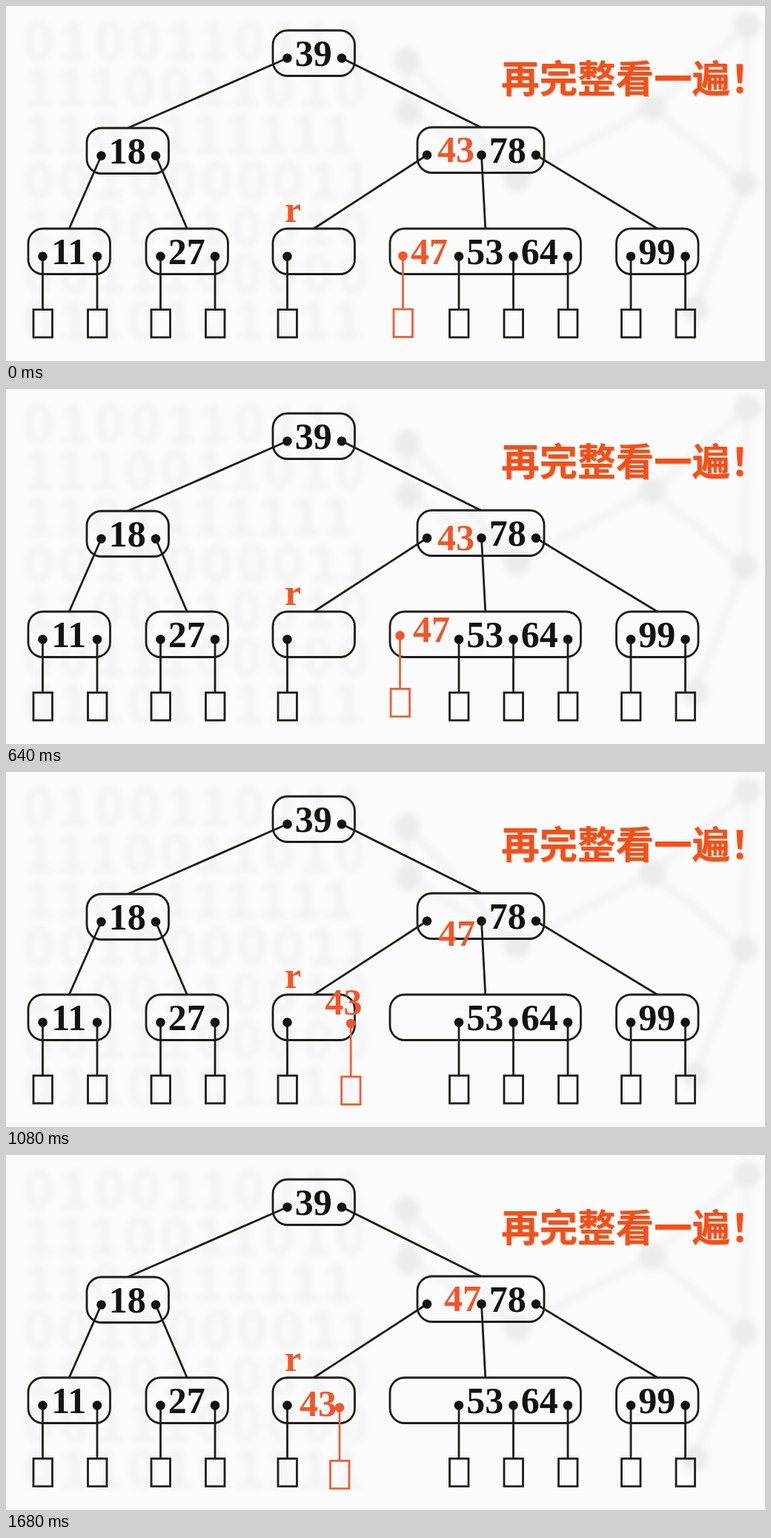
These frames come from a looping animation (1024x480 px, 1720 ms). An HTML page:

```html
<!DOCTYPE html>
<html lang="zh-CN">
<head>
<meta charset="utf-8">
<title>B-tree rotation</title>
<style>
html, body { margin: 0; width: 100%; height: 100%; overflow: hidden; background: #fcfbfc; }
svg { display: block; width: 1024px; height: 480px; }
.ghost { fill: #f3f3f3; font: bold 72px "Liberation Sans", Arial, sans-serif; letter-spacing: 8px; }
.web { stroke: #f3f3f3; stroke-width: 9; }
.hub { fill: #ececec; }
.num { font: bold 50px "Liberation Serif", "Times New Roman", serif; text-anchor: middle; fill: #14140f; }
.ink { stroke: #1e1e18; stroke-width: 2.8; fill: none; }
.dot { fill: #14140f; }
.hot .num, .hot .dot { fill: #f0562a; }
.hot .ink { stroke: #ea6038; }
.title {
  font: bold 51.5px "Noto Sans CJK SC", "Noto Sans CJK", sans-serif;
  fill: #f2501a; text-shadow: 1px 1px 1.5px rgba(150, 80, 20, .4);
}
</style>
</head>
<body>
<svg viewBox="0 0 1024 480" xmlns="http://www.w3.org/2000/svg">
  <defs><filter id="soft"><feGaussianBlur stdDeviation="4"/></filter></defs>
  <g id="back" filter="url(#soft)"></g>
  <g id="tree"></g>
  <text class="title" x="668" y="117">再完整看一遍！</text>
  <g class="hot">
    <text class="num" x="387" y="292">r</text>
    <g id="down"></g>
    <g id="up"></g>
    <g id="leaf"></g>
  </g>
</svg>
<script>
const $ = id => document.getElementById(id);

function add(parent, tag, attrs, text) {
  const el = document.createElementNS("http://www.w3.org/2000/svg", tag);
  for (const k in attrs) el.setAttribute(k, attrs[k]);
  if (text) el.textContent = text;
  parent.append(el);
}
const line = (g, x1, y1, x2, y2, cls = "ink") => add(g, "line", { x1, y1, x2, y2, class: cls });
const circle = (g, cx, cy, r = 6.3, cls = "dot") => add(g, "circle", { cx, cy, r, class: cls });
const num = (g, x, y, n) => add(g, "text", { x, y, class: "num" }, n);
const box = (g, x, y, width, height, rx) => add(g, "rect", { x, y, width, height, rx, class: "ink" });

function leaf(g, x, y) {
  line(g, x, y, x, y + 72);
  box(g, x - 12.5, y + 72, 25.5, 37.5, 0);
  circle(g, x, y);
}

// Faint backdrop: random bits on the left, a web of hubs on the right
let seed = 7;
const random = () => (seed = seed * 16807 % 2147483647) / 2147483647;
const back = $("back");
for (let y = 72; y < 480; y += 63) {
  const bits = Array.from({ length: 10 }, () => Math.round(random())).join("");
  add(back, "text", { x: 24, y, class: "ghost" }, bits);
}
const hubs = [[872, 137], [1000, 26], [996, 240], [930, 410], [690, 234], [541, 74], [543, 143]];
hubs.forEach(([x, y], i) => {
  for (const [x2, y2] of hubs.slice(i + 1))
    if (Math.hypot(x - x2, y - y2) < 240) line(back, x, y, x2, y2, "web");
  circle(back, x, y, 18, "hub");
});

// Tree: null marks a key or pointer slot that is empty or filled by a moving part
const PITCH = 73.5, HEIGHT = 61.5;

function node(x, y, keys, children, pad = 18.5) {
  const width = keys.length * PITCH + 2 * pad;
  const g = $("tree");
  box(g, x, y, width, HEIGHT, 20);
  children.forEach((child, i) => {
    if (child === null) return;
    const dx = x + pad + 1 + i * PITCH, dy = y + 37.5;
    if (child === "leaf") return leaf(g, dx, dy);
    line(g, dx, dy, child.top, child.y);
    circle(g, dx, dy);
  });
  keys.forEach((key, i) => key && num(g, x + pad - .5 + (i + .5) * PITCH, y + 48, key));
  return { top: x + width / 2, y };
}
const bottom = (x, keys, leaves = [...keys, 0].map(() => "leaf")) => node(x, 301, keys, leaves);

node(360, 33, [39], [
  node(109, 165, [18], [bottom(30, [11]), bottom(189, [27])]),
  node(555, 164, [null, 78], [
    bottom(360, [null], ["leaf", null]),
    bottom(518, [null, 53, 64], [null, "leaf", "leaf", "leaf"]),
    bottom(823.5, [99])
  ], 12)
]);

// Moving parts: resting place, start and end of the path
num($("down"), 0, 0, 43);
num($("up"), 0, 0, 47);
leaf($("leaf"), 0, 0);
const movers = [
  { el: $("down"), rest: [607, 211], from: [616, 211], to: [421, 353] },
  { el: $("up"), rest: [571, 348.5], from: [572, 348.5], to: [616, 211] },
  { el: $("leaf"), rest: [535.5, 338], from: [535.5, 333], to: [450, 341.5] }
];
const TICK = 40, LOOP = 1720, JUMP = 400, START = 600, SPAN = 780;

// Sine ease, warped for a quick start and a long slow-down
const ease = u => Math.sin(Math.PI / 2 * u ** (2 / 3)) ** 2;

function draw(now) {
  const t = Math.floor((now % LOOP) / TICK) * TICK;
  const p = ease(Math.max(0, Math.min(1, (t - START) / SPAN)));
  for (const { el, rest, from, to } of movers) {
    const [x, y] = t < JUMP ? rest : from.map((a, k) => a + (to[k] - a) * p);
    el.setAttribute("transform", `translate(${x} ${y})`);
  }
}
const t0 = performance.now();
function loop() {
  draw(performance.now() - t0);
  requestAnimationFrame(loop);
}
loop();
</script>
</body>
</html>
```
